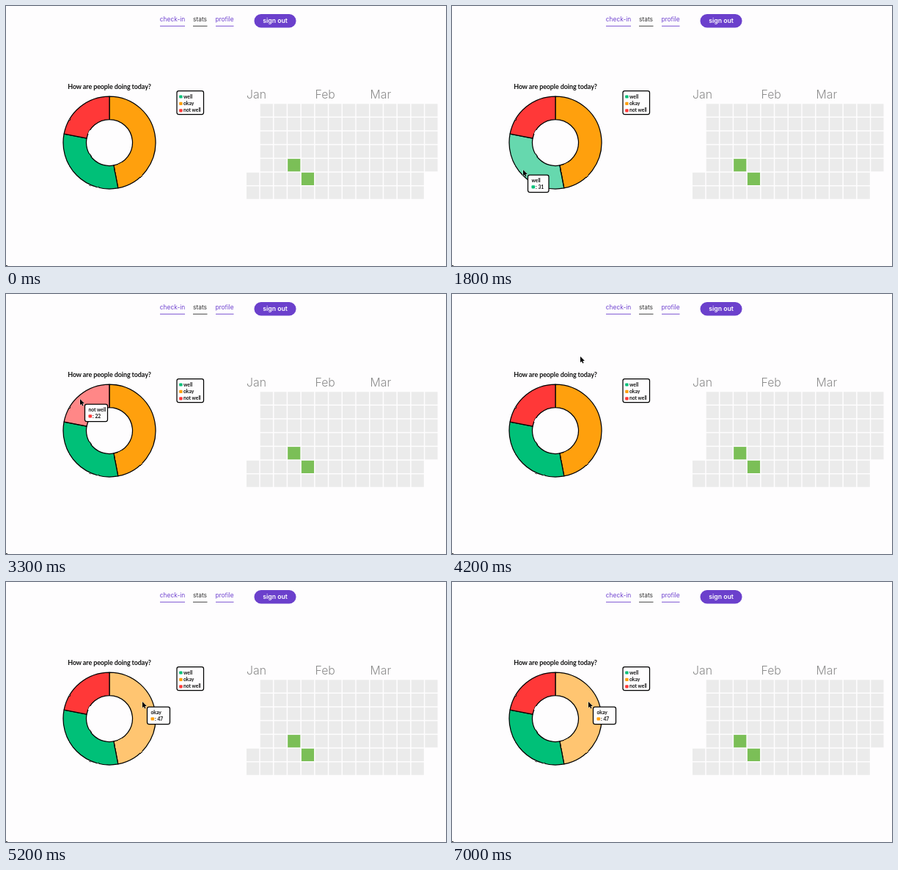
An HTML page for the animation above (7.2 s loop, 600 by 354 pixels).

```html
<!DOCTYPE html>
<html lang="en">
<head>
<meta charset="utf-8">
<title>Check-in stats</title>
<style>
  html, body { margin: 0; width: 100%; height: 100%; overflow: hidden; background: #fefdfe; }
  svg { display: block; width: 600px; height: 354px; }
  text { font-family: Inter, "Open Sans", sans-serif; }
  .nav { font-size: 8.4px; fill: #6f42cf; }
  .nav.on { fill: #333; }
  .button { font-size: 8.7px; font-weight: 600; fill: #fff; }
  .month { font-size: 15.8px; font-weight: 300; fill: #8d8d8d; }
  .hand text { font: 700 6.7px Lato, "Open Sans", sans-serif; fill: #111; }
  .hand .title { font-size: 9px; letter-spacing: -.12px; }
  .ink { stroke: #000; stroke-width: 1.25; stroke-linejoin: round; filter: url(#wobble); }
  .box { fill: #fefdfe; }
</style>
</head>
<body>
<svg viewBox="0 0 600 354">
  <defs>
    <filter id="wobble">
      <feTurbulence type="fractalNoise" baseFrequency=".1" result="noise"/>
      <feDisplacementMap in="SourceGraphic" in2="noise" scale="2.3" xChannelSelector="R" yChannelSelector="G"/>
    </filter>
  </defs>

  <g id="header">
    <text class="nav" x="227" y="21" text-anchor="middle">check-in</text>
    <text class="nav on" x="264.5" y="21" text-anchor="middle">stats</text>
    <text class="nav" x="298" y="21" text-anchor="middle">profile</text>
    <path d="M210 27.3H244M286 27.3H310.5" stroke="#6f42cf" stroke-width=".9"/>
    <path d="M255 27.3H274.5" stroke="#333" stroke-width=".9"/>
    <rect x="338.5" y="11" width="57" height="18.5" rx="9.25" fill="#6b40cc"/>
    <text class="button" x="367" y="23.2" text-anchor="middle">sign out</text>
  </g>

  <g id="calendar">
    <text class="month" x="328" y="126">Jan</text>
    <text class="month" x="421.5" y="126">Feb</text>
    <text class="month" x="496.5" y="126">Mar</text>
  </g>

  <g class="hand">
    <text class="title" x="141" y="113.4" text-anchor="middle">How are people doing today?</text>
    <g id="donut"></g>
    <g id="legend">
      <rect class="ink box" x="233" y="115.5" width="36.5" height="32" rx="2.5"/>
    </g>
    <g id="tip">
      <rect class="ink box" id="tipBox" height="23.5" rx="2.5"/>
      <text id="tipName" x="5" y="9.7"></text>
      <rect id="tipKey" x="5" y="14.3" width="4.6" height="4.2" rx="1" filter="url(#wobble)"/>
      <text id="tipValue" x="10.6" y="18.6"></text>
    </g>
  </g>

  <rect y="353" width="2" height="1" fill="#333"/>
  <path id="cursor" d="M0 0V8.2L1.9 6.5 3.2 9.4 4.5 8.8 3.3 6H5.9Z" fill="#000" stroke="#fff" stroke-width=".7" paint-order="stroke"/>
</svg>

<script>
const LOOP = 7200, STEP = 100;
const CX = 141, CY = 186, OUTER = 63, INNER = 31.5;
const slices = [
  { name: "okay", value: 47, color: "#ffa011" },
  { name: "well", value: 31, color: "#04c078" },
  { name: "not well", value: 22, color: "#ff3938" }
];
// Pointer stops: time, x, y
const route = [
  [200, 100, 345], [400, 95, 340], [600, 95, 340], [1000, 99, 265],
  [1400, 99, 226], [1700, 97, 223], [2100, 97, 223], [2300, 62, 197],
  [2500, 30, 162], [2600, 39, 149], [2900, 80, 132], [3000, 92, 138],
  [3300, 101, 143], [3600, 101, 143], [3900, 137, 108], [4200, 175, 85],
  [4400, 178, 102], [4700, 182, 137], [5000, 186, 160], [5200, 186, 163]
];

const $ = id => document.getElementById(id);
function add(parent, tag, attrs, text = "") {
  const el = document.createElementNS("http://www.w3.org/2000/svg", tag);
  for (const key in attrs) el.setAttribute(key, attrs[key]);
  el.textContent = text;
  return parent.appendChild(el);
}

function buildCalendar() {
  for (let col = 0; col < 14; col++) {
    for (let row = col ? 0 : 5; row < (col === 13 ? 5 : 7); row++) {
      const done = (col === 3 && row === 4) || (col === 4 && row === 5);
      add($("calendar"), "rect", {
        x: 328 + col * 18.72, y: 133.3 + row * 18.7, width: 17.2, height: 17.2,
        fill: done ? "#7bbf57" : "#ebebeb"
      });
    }
  }
}

function point(radius, share) {
  const a = share / 100 * 2 * Math.PI;
  return `${CX + radius * Math.sin(a)} ${CY - radius * Math.cos(a)}`;
}

function buildDonut() {
  let from = 0;
  for (const s of slices) {
    const to = from + s.value;
    s.from = from;
    s.to = to;
    s.el = add($("donut"), "path", {
      class: "ink", fill: s.color,
      d: `M${point(OUTER, from)}A${OUTER} ${OUTER} 0 0 1 ${point(OUTER, to)}` +
         `L${point(INNER, to)}A${INNER} ${INNER} 0 0 0 ${point(INNER, from)}Z`
    });
    from = to;
  }
}

function buildLegend() {
  [slices[1], slices[0], slices[2]].forEach((s, i) => {
    const y = 123.4 + i * 9.4;
    add($("legend"), "rect", {
      x: 236.2, y: y - 2, width: 4.4, height: 4.2, rx: 1, fill: s.color, filter: "url(#wobble)"
    });
    add($("legend"), "text", { x: 242, y: y + 2.2 }, s.name);
  });
}

function pointerAt(t) {
  const i = route.findIndex(stop => stop[0] > t);
  if (i < 0) return route[route.length - 1].slice(1);
  const [t0, x0, y0] = route[i - 1], [t1, x1, y1] = route[i];
  const k = (t - t0) / (t1 - t0);
  return [x0 + (x1 - x0) * k, y0 + (y1 - y0) * k];
}

function sliceAt(x, y) {
  const dx = x - CX, dy = y - CY, r = Math.hypot(dx, dy);
  if (r < INNER || r > OUTER) return;
  const share = (Math.atan2(dx, -dy) / (2 * Math.PI) + 1) % 1 * 100;
  return slices.find(s => share >= s.from && share < s.to);
}

function draw(now) {
  const t = Math.floor(now % LOOP / STEP) * STEP;
  const visible = t >= route[0][0];
  const [x, y] = visible ? pointerAt(t) : [-20, -20];
  const hit = sliceAt(x, y);

  $("cursor").setAttribute("transform", `translate(${x} ${y})`);
  for (const s of slices) s.el.setAttribute("fill-opacity", s === hit ? .6 : 1);
  $("tip").setAttribute("visibility", hit ? "visible" : "hidden");
  if (hit) {
    $("tip").setAttribute("transform", `translate(${x + 6.5} ${y + 7})`);
    $("tipBox").setAttribute("width", hit.name === "well" ? 28.5 : 31);
    $("tipName").textContent = hit.name;
    $("tipKey").setAttribute("fill", hit.color);
    $("tipValue").textContent = ": " + hit.value;
  }
}

buildCalendar();
buildDonut();
buildLegend();
const start = performance.now();
(function tick() {
  draw(performance.now() - start);
  requestAnimationFrame(tick);
})();
</script>
</body>
</html>
```
